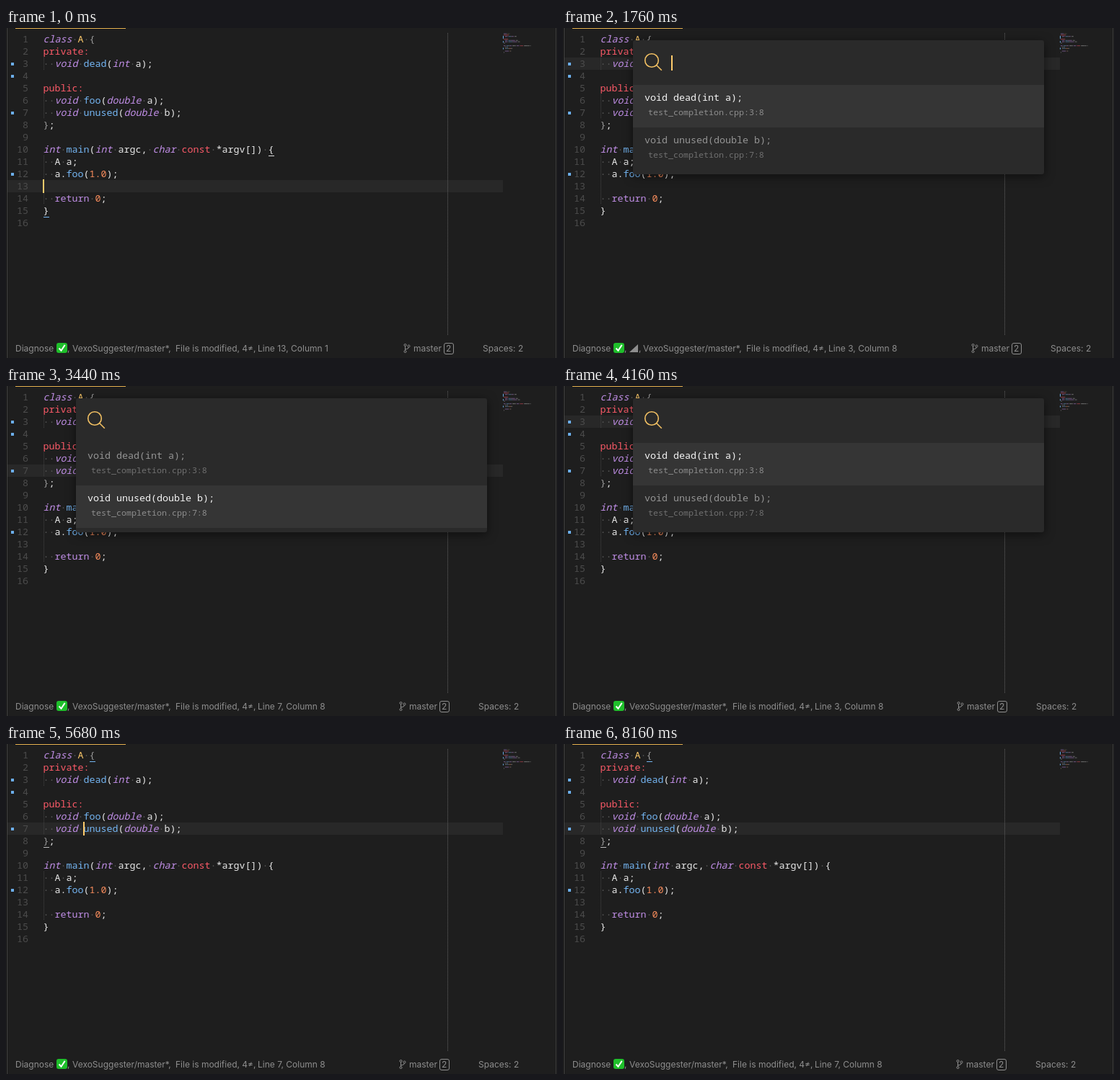
Recreate the animation shown at these times as an HTML page. Size 764 by 458 pixels, loop 8.4 s.

```html
<!DOCTYPE html>
<html lang="en">
<head>
<meta charset="utf-8">
<title>Unused code panel</title>
<style>
  html, body { margin: 0; width: 100%; height: 100%; overflow: hidden; background: #1e1e1e; }
  svg { display: block; }
  text { white-space: pre; }
  .code { font: 500 13.333px "Noto Sans Mono", monospace; fill: #e8e8e8; }
  .type { fill: #c08ee6; font-style: italic; }
  .flow { fill: #c08ee6; }
  .mod { fill: #fb5a68; }
  .name { fill: #ffcb6b; }
  .func { fill: #74b5f2; }
  .num { fill: #f78c5c; }
  .dim { fill: #999; }
  .dot { fill: #5a5a5a; }
  .line { font-weight: 400; fill: #4c4c4c; text-anchor: end; }
  .status { font: 12px Inter, sans-serif; fill: #8e8e8e; }
  .detail { font: 11.667px "Noto Sans Mono", monospace; fill: #707070; }
  .item .title { fill: #949494; }
  .item .back { fill: none; }
  .on .title { fill: #f4f4f4; }
  .on .detail { fill: #8e8e8e; }
  .on .back { fill: #353535; }
</style>
</head>
<body>
<svg id="stage" width="764" height="458" viewBox="0 0 764 458">
  <rect width="764" height="458" fill="#1e1e1e"/>
  <rect width="1" height="458" fill="#0c0c0c"/>
  <rect x="1" width="1" height="458" fill="#454545"/>
  <rect x="762" width="1" height="458" fill="#3a3a3a"/>
  <rect x="13" width="153" height="1" fill="#e5b04f"/>
  <rect id="row" x="2" width="687" height="17" fill="#282828"/>
  <path d="M612.5 7V426" stroke="#626262" stroke-dasharray="1 1"/>
  <path d="M52.5 41v17M52.5 92v34M52.5 177v68" stroke="#444" stroke-dasharray="1 1"/>
  <g id="code"></g>
  <g id="map" opacity=".65"></g>
  <g id="marks"></g>
  <g id="mainPair"><rect x="364" y="177" width="8" height="1" fill="#ddd"/><rect x="52" y="262" width="8" height="1" fill="#74b5f2"/></g>
  <g id="classPair"><rect x="116" y="24" width="8" height="1" fill="#74b5f2"/><rect x="52" y="143" width="8" height="1" fill="#bbb"/></g>
  <rect id="caret" width="2" height="19" fill="#ffcb6b"/>

  <g class="status">
    <text x="13" y="449">Diagnose</text>
    <rect x="70" y="437" width="15" height="14" rx="3" fill="#1fbf2b"/>
    <path d="M73.5 444.5l3 3.2 5.2-7.8" fill="none" stroke="#fff" stroke-width="2"/>
    <text x="85" y="449">,</text>
    <g id="spinner"><path d="M92 450h12v-11z" fill="#8e8e8e"/><text x="105" y="449">,</text></g>
    <g id="info">
      <text x="92" y="449">VexoSuggester/master*,</text>
      <text x="235" y="449">File is modified, 4≠,</text>
      <text id="place" x="349" y="449"></text>
    </g>
    <g id="right">
      <g fill="none" stroke="#8e8e8e">
        <circle cx="553.5" cy="440" r="1.5"/><circle cx="553.5" cy="449" r="1.5"/><circle cx="558.5" cy="441.5" r="1.5"/>
        <path d="M553.5 441.5v6M558.5 443q0 2.5-5 3"/>
        <rect x="607.5" y="437.5" width="13" height="15" rx="2.5"/>
      </g>
      <text x="565" y="449">master</text>
      <text x="610" y="449">2</text>
      <text x="661" y="449">Spaces: 2</text>
    </g>
  </g>

  <g id="panel">
    <rect x="97" y="17" width="570" height="186" rx="3" fill="#2a2a2a" style="filter: drop-shadow(0 3px 7px rgba(0,0,0,.5))"/>
    <g fill="none" stroke="#f2c063" stroke-width="1.6"><circle cx="123" cy="45" r="9.3"/><path d="M129.8 51.8l7 7"/></g>
    <rect id="inputCaret" x="150" y="38" width="2" height="21" fill="#ffcb6b"/>
    <g id="items"></g>
  </g>
</svg>
<script>
const LOOP = 8400, OPEN = 1680, CLOSE = 5680, SPIN_END = 2080;
const source = `class A {
private:
  void dead(int a);

public:
  void foo(double a);
  void unused(double b);
};

int main(int argc, char const *argv[]) {
  A a;
  a.foo(1.0);

  return 0;
}
`.split("\n");
const rules = [
  ["dot", / +/y], ["type", /(class|void|int|double|char)\b/y],
  ["mod", /private:|public:|const\b/y], ["flow", /return\b/y],
  ["func", /(dead|foo|unused|main)\b/y], ["num", /\d[.\d]*/y],
  ["name", /A(?= \{)/y], ["", /\w+|[^\w\s]/y]
];
const $ = id => document.getElementById(id);

function add(parent, tag, attrs, text) {
  const el = document.createElementNS("http://www.w3.org/2000/svg", tag);
  for (const key in attrs) el.setAttribute(key, attrs[key]);
  if (text) el.textContent = text;
  return parent.appendChild(el);
}

function tokens(line, scope) {
  const list = [];
  for (let col = 0; col < line.length;) {
    for (const [kind, rx] of rules) {
      rx.lastIndex = col;
      const hit = rx.exec(line);
      if (!hit) continue;
      const faded = scope && /[{}]/.test(hit[0]);
      list.push({ col, text: hit[0], kind: faded ? "dim" : kind });
      col += hit[0].length;
      break;
    }
  }
  return list;
}

source.forEach((line, i) => {
  const y = 20 + 17 * i;
  add($("code"), "text", { x: 31, y, class: "code line" }, String(i + 1));
  for (const { col, text, kind } of tokens(line, i === 0 || i === 7)) {
    const shown = kind === "dot" ? "·".repeat(text.length) : text;
    add($("code"), "text", { x: 51.5 + 8 * col, y, class: "code " + kind }, shown);
    if (kind !== "dot") {
      add($("map"), "rect", {
        x: 690 + 0.94 * col, y: 7.5 + 1.85 * i, width: 0.9 * text.length, height: 1,
        class: kind, fill: "#ccc", opacity: 0.75
      });
    }
  }
});

for (const n of [3, 4, 7, 12]) {
  add($("marks"), "rect", { x: 7, y: 17 * n - 3, width: 4, height: 4, fill: "#6caeea" });
  add($("marks"), "rect", { x: 689, y: 5.3 + 1.85 * n, width: 1, height: 2, fill: "#6caeea" });
}

const items = [["void dead(int a);", 3], ["void unused(double b);", 7]].map(([title, line], i) => {
  const g = add($("items"), "g", { transform: `translate(0 ${59 * i})` });
  add(g, "rect", { x: 97, y: 79, width: 570, height: 59, class: "back" });
  add(g, "text", { x: 113, y: 101, class: "code title" }, title);
  add(g, "text", { x: 118, y: 121, class: "detail" }, `test_completion.cpp:${line}:8`);
  return g;
});

// Caret opacity: dark around each multiple of the period after `dark`.
function blink(t, dark) {
  const gap = Math.abs(t - dark - 960 * Math.round((t - dark) / 960));
  const k = Math.min(1, Math.max(0, (gap - 120) / 200));
  return k * k * (3 - 2 * k);
}

const show = (id, on) => $(id).setAttribute("visibility", on ? "visible" : "hidden");
const shift = (id, dx) => $(id).setAttribute("transform", `translate(${dx} 0)`);

function draw(t) {
  const before = t < OPEN, after = t >= CLOSE, open = !before && !after;
  const second = t >= 3360 && !(t >= 4000 && t < 4480);
  const line = before ? 13 : after || second ? 7 : 3;
  const spin = open && t < SPIN_END;

  $("row").setAttribute("y", 17 * line - 10);
  show("mainPair", before);
  show("classPair", after);
  show("panel", open);
  show("spinner", spin);

  $("caret").setAttribute("x", before ? 51 : 107);
  $("caret").setAttribute("y", 17 * line - 11);
  const main = before ? (t < 1280 ? blink(t, 400) : 0) : after ? (t < 5900 ? 1 : blink(t, 6360)) : 0;
  $("caret").setAttribute("opacity", main);
  $("inputCaret").setAttribute("opacity", t < 1900 ? 1 : blink(t, 2360));
  items.forEach((g, i) => g.setAttribute("class", (i === 1) === second ? "item on" : "item"));

  $("place").textContent = `Line ${line}, Column ${before ? 1 : 8}`;
  shift("info", spin ? 19 : 0);
  shift("right", before ? 0 : spin ? 15 : line === 3 ? -5 : -6);
}

function tick() {
  draw(performance.now() % LOOP);
  requestAnimationFrame(tick);
}
tick();
</script>
</body>
</html>
```
